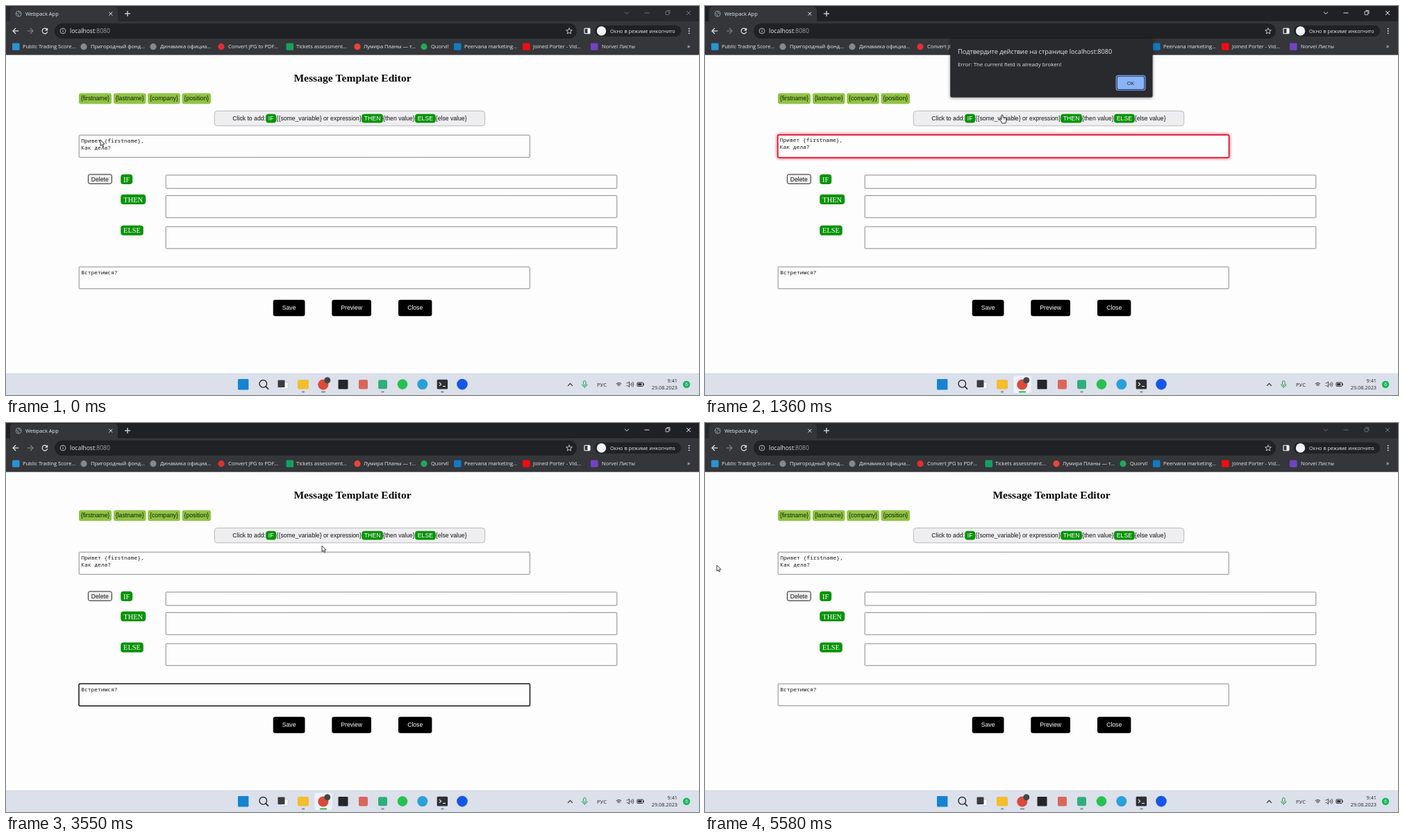
These frames come from a looping animation (998 by 561 pixels, 5.61 s). An HTML page with a canvas:

```html
<!DOCTYPE html>
<html lang="ru">
<head>
<meta charset="utf-8">
<title>Message Template Editor</title>
<style>
html, body { margin: 0; width: 100%; height: 100%; overflow: hidden; background: #fdfdfd; }
canvas { display: block; width: 998px; height: 561px; }
</style>
</head>
<body>
<canvas id="stage"></canvas>
<script>
const W = 998, H = 561, LOOP = 5610;
const canvas = document.getElementById('stage');
const ratio = window.devicePixelRatio || 1;
canvas.width = Math.round(W * ratio);
canvas.height = Math.round(H * ratio);
const ctx = canvas.getContext('2d');

const UI = '"Open Sans", "Noto Sans", sans-serif';
const SANS = '"Liberation Sans", Arial, sans-serif';
const SERIF = '"Liberation Serif", "Times New Roman", serif';
const MONO = '"Noto Sans Mono", monospace';
const GREEN = '#089308', FRAME = '#202124', BAR = '#35363a', PALE = '#e8eaed';

function text(str, x, y, size, family, color, align = 'left', weight = '') {
  ctx.font = `${weight} ${size}px ${family}`;
  ctx.fillStyle = color;
  ctx.textAlign = align;
  ctx.fillText(str, x, y);
}

function box(x, y, w, h, r, fill, stroke, lw = 1) {
  ctx.beginPath();
  ctx.roundRect(x, y, w, h, r);
  if (fill) { ctx.fillStyle = fill; ctx.fill(); }
  if (stroke) { ctx.strokeStyle = stroke; ctx.lineWidth = lw; ctx.stroke(); }
}

function disc(x, y, r, fill, stroke, lw = 1) {
  ctx.beginPath();
  ctx.arc(x, y, r, 0, 7);
  if (fill) { ctx.fillStyle = fill; ctx.fill(); }
  if (stroke) { ctx.strokeStyle = stroke; ctx.lineWidth = lw; ctx.stroke(); }
}

function path(ox, oy, pts, stroke, lw = 1, fill) {
  ctx.beginPath();
  for (let i = 0; i < pts.length; i += 2) ctx.lineTo(ox + pts[i], oy + pts[i + 1]);
  if (fill) { ctx.closePath(); ctx.fillStyle = fill; ctx.fill(); }
  ctx.strokeStyle = stroke;
  ctx.lineWidth = lw;
  ctx.stroke();
}

function cross(x, y, r, color) {
  path(x, y, [-r, -r, r, r], color);
  path(x, y, [r, -r, -r, r], color);
}

// ---- browser frame ----
const bookmarks = [
  [9, 24, 'Public Trading Score...', '#2b93d1', 'square'],
  [107, 122, 'Пригородный фонд...', '#85888c', 'disc'],
  [207, 222, 'Динамика официа...', '#85888c', 'disc'],
  [305, 320, 'Convert JPG to PDF...', '#e52d35', 'disc'],
  [403.5, 418, 'Tickets assessment...', '#12a260', 'square'],
  [501, 515, 'Лумира Планы — т...', '#ee4338', 'disc'],
  [597, 612, 'Quorvi!', '#22a95b', 'disc'],
  [645, 660, 'Peervana marketing...', '#1279c4', 'square'],
  [744, 759, 'Joined Porter - Vid...', '#f00d12', 'square'],
  [842, 858, 'Norvel Листы', '#7441c4', 'square']
];

function drawBrowser(active) {
  box(0, 0, W, 23, 0, active ? FRAME : '#28292c');
  box(6, 1, 155, 24, [5, 5, 0, 0], BAR);
  box(0, 22, W, 48.5, 0, BAR);

  disc(18.2, 11.2, 4, null, '#9aa0a6', .9);
  path(18.2, 11.2, [-3.7, -1, -1, .5, 0, 3.6], '#9aa0a6', .9);
  path(18.2, 11.2, [0, -3.7, .6, -1.2, 3.6, 0], '#9aa0a6', .9);
  text('Webpack App', 28, 13.8, 7.5, UI, PALE);
  cross(150.8, 11.2, 2.4, PALE);
  path(175, 11, [-4, 0, 4, 0], PALE, 1.2);
  path(175, 11, [0, -4, 0, 4], PALE, 1.2);

  const win = active ? '#f1f1f1' : '#77797d';
  path(894, 10, [-3, -1.3, 0, 1.5, 3, -1.3], win, .9);
  path(923, 10, [-3.5, 0, 3.5, 0], win, .9);
  box(950, 7.8, 4.8, 4.8, .5, null, win, .8);
  path(951.5, 7.7, [0, -1.2, 4.5, -1.2, 4.5, 3.4], win, .8);
  cross(983, 10, 3, win);

  path(14, 36, [4.2, 0, -4, 0], PALE, 1.2);
  path(14, 36, [0, -4, -4, 0, 0, 4], PALE, 1.2);
  path(35, 36, [-4.2, 0, 4, 0], '#808387', 1.1);
  path(35, 36, [0, -4, 4, 0, 0, 4], '#808387', 1.1);
  ctx.beginPath();
  ctx.arc(56, 36, 3.8, .3, 5.5);
  ctx.strokeStyle = PALE; ctx.lineWidth = 1.2; ctx.stroke();
  path(59.8, 32, [0, 0, 0, 3.2, -3.2, 3.2], PALE, .6, PALE);

  box(70, 25.2, 752, 21.8, 11, FRAME);
  disc(82, 36, 3.9, null, '#bdc1c6', .9);
  box(81.5, 35.3, 1, 2.8, 0, '#bdc1c6');
  box(81.5, 33.6, 1, 1, 0, '#bdc1c6');
  text('localhost', 92, 39.1, 8.6, UI, PALE);
  const port = 92 + ctx.measureText('localhost').width;
  text(':8080', port, 39.1, 8.6, UI, '#9aa0a6');

  const star = [];
  for (let i = 0; i <= 10; i++) {
    const a = i * Math.PI / 5 - Math.PI / 2, r = i % 2 ? 2 : 4.6;
    star.push(r * Math.cos(a), r * Math.sin(a));
  }
  path(811, 36.3, star, PALE, .8);
  box(833, 32.2, 8, 7.6, 1, null, '#fff', 1.1);
  box(837.5, 32.2, 3.5, 7.6, 0, '#fff');
  box(848, 28, 124, 16, 8, FRAME);
  disc(857.5, 36, 6.7, '#f2f3f4');
  text('Окно в режиме инкогнито', 870, 38.6, 7.3, UI, PALE);
  for (const dy of [-3.3, 0, 3.3]) disc(983.7, 36 + dy, .9, PALE);

  for (const [x, tx, label, color, kind] of bookmarks) {
    if (kind === 'disc') disc(x + 5, 58.7, 4.6, color);
    else box(x, 53.6, 10.6, 10.2, 1.5, color);
    text(label, tx, 61.4, 7.5, UI, PALE);
  }
  text('»', 981, 61.4, 8.5, UI, PALE);
}

// ---- page ----
function field(x, y, w, h, lines, state) {
  if (state === 'red') {
    ctx.save();
    ctx.shadowColor = 'rgba(240,20,50,.85)';
    ctx.shadowBlur = 4 * ratio;
    box(x, y, w, h, 1.5, '#fff', '#d9102e', 1.5);
    ctx.restore();
    box(x, y, w, h, 1.5, '#fdfdfd', '#d9102e', 1.4);
  } else if (state === 'black') {
    box(x, y, w, h, 1.5, '#fdfdfd', '#16161c', 1.5);
  } else {
    box(x + .2, y + .2, w - .4, h - .4, 1, '#fdfdfd', '#7d7d84', .9);
  }
  const d = state === 'red' ? .5 : 0;
  lines.forEach((s, i) => text(s, x + 3.2 - d, y + 10.8 - d + i * 9.8, 7.95, MONO, '#161616'));
}

function drawPage(state1, state2) {
  box(0, 70.5, W, 460, 0, '#fdfdfd');
  text('Message Template Editor', 499, 109, 15.6, SERIF, '#080808', 'center', 'bold');

  for (const [x, w, s] of [[105, 47, '{firstname}'], [155, 46.5, '{lastname}'],
                           [204.3, 46.5, '{company}'], [253.6, 41.4, '{position}']]) {
    box(x, 125.8, w, 15.4, 3, '#8fc443');
    text(s, x + w / 2, 136.4, 8.67, SANS, '#141c08', 'center');
  }

  box(300.3, 151.4, 389.4, 21.4, 4, '#eeeef0', '#b5b4ac', .9);
  text('Click to add:', 326.3, 165, 8.67, SANS, '#111');
  text('{{some_variable} or expression}', 389.6, 165, 8.67, SANS, '#111');
  text('{then value}', 543, 165, 8.67, SANS, '#111');
  text('{else value}', 618.8, 165, 8.67, SANS, '#111');
  for (const [x, w, s] of [[374.2, 15, 'IF'], [512.2, 30.8, 'THEN'], [589, 29.8, 'ELSE']]) {
    box(x, 155.8, w, 12.6, 4, GREEN);
    text(s, x + w / 2, 165, 8.67, SANS, '#fff', 'center');
  }

  field(105, 186, 649.5, 32.5, ['Привет {firstname},', 'Как дела?'], state1);
  field(230, 243.7, 650, 19.6, [], '');
  field(230, 273.2, 650, 32.2, [], '');
  field(230, 318, 650, 32, [], '');
  field(105, 376, 649.5, 32, ['Встретимся?'], state2);

  box(118.4, 242.9, 33.9, 13.4, 2.5, '#efefef', '#222', 1);
  text('Delete', 135.3, 252.7, 8.67, SANS, '#111', 'center');
  for (const [y, w, s] of [[242.8, 17, 'IF'], [271.8, 36, 'THEN'], [316.6, 32.6, 'ELSE']]) {
    box(165.2, y, w, 14.2, 4, GREEN);
    text(s, 165.2 + w / 2, y + 10.8, 10.4, SERIF, '#fff', 'center');
  }
  for (const [x, w, s] of [[384.7, 45.8, 'Save'], [469.3, 56.7, 'Preview'], [565, 48.4, 'Close']]) {
    box(x, 423.8, w, 23.4, 3, '#000');
    text(s, x + w / 2, 438, 8.67, SANS, '#fff', 'center');
  }
}

// ---- taskbar ----
function drawTaskbar(active) {
  const ink = '#26282c', mid = 545.6;
  box(0, 530, W, 31, 0, '#dbe0ea');
  box(0, 529.8, W, .7, 0, '#cfd4de');
  if (active) box(444.5, 533.5, 25, 24.5, 3, '#f1f3f8');

  box(334, 538, 15.4, 15.4, 1, '#1583d3');
  disc(370.3, 544.8, 5.3, null, ink, 1.4);
  path(374, 548.6, [0, 0, 4, 4], ink, 1.6);
  box(395.5, 542.5, 10.5, 9.5, 1, '#f8f9fb', '#b4b8be', .6);
  box(391.5, 539.5, 10, 10.5, 1, '#3a3c40');
  box(420, 539, 16, 13.5, 2, '#f4bd2d');
  disc(456.8, 546, 7.6, '#dc4a3c');
  disc(462.8, 539.8, 4.5, '#444649');
  box(478.5, 539, 14, 13.5, 1, '#25262a');
  box(508, 539, 13, 13.5, 2, '#d9665b');
  box(536, 539.2, 13, 13, 2.5, '#2eaf7d');
  disc(571, mid, 7.3, '#27c152');
  disc(599.8, mid, 7.5, '#29a0d8');
  box(620.7, 538.8, 15.4, 13.6, 1.5, '#2d2f33');
  path(624, 543, [0, 0, 2.6, 2.4, 0, 4.8], '#f4f4f4', 1.1);
  path(629, 548.5, [0, 0, 4, 0], '#f4f4f4', 1.1);
  disc(657, mid, 7.8, '#1556e8');

  for (const x of [428, 542.5, 628.5]) box(x - 2.2, 555.6, 4.4, 1.8, .9, '#858a93');
  if (active) box(451.8, 555.6, 10.4, 2, 1, '#25b654');
  else box(453.8, 555.6, 6.4, 1.8, .9, '#858a93');

  path(812.5, 546, [-3.4, 1.8, 0, -1.6, 3.4, 1.8], ink, 1.1);
  box(831.6, 540.5, 3.4, 6.4, 1.7, null, '#2a9b55', 1);
  ctx.beginPath();
  ctx.arc(833.3, 545.3, 3.6, 0, Math.PI);
  ctx.stroke();
  path(833.3, 549, [0, 0, 0, 2], '#2a9b55', 1);
  text('РУС', 858, 548.5, 7.6, UI, ink, 'center');

  for (const r of [1.8, 3.6, 5.4]) {
    ctx.beginPath();
    ctx.arc(882.5, 549, r, -2.3, -.84);
    ctx.strokeStyle = ink; ctx.lineWidth = 1; ctx.stroke();
  }
  path(893.5, 543.8, [0, 0, 2, 0, 4, -2, 4, 5.8, 2, 3.8, 0, 3.8], ink, .8);
  for (const r of [2, 4, 6]) {
    ctx.beginPath();
    ctx.arc(897.6, 545.7, r, -.7, .7);
    ctx.stroke();
  }
  box(909, 543, 8.6, 5.4, 1, null, ink, 1);
  box(910.2, 544.2, 5.2, 3, 0, ink);
  box(917.6, 544.6, 1.2, 2.2, 0, ink);
  text('9:41', 967, 542.8, 7.3, UI, ink, 'right');
  text('29.08.2023', 967, 552.7, 7.3, UI, ink, 'right');
  disc(980, 545.8, 5.2, '#1ab65c');
  text('6', 980, 548.2, 6.4, UI, '#fff', 'center');
}

// ---- dialog ----
const clamp = v => Math.max(0, Math.min(1, v));
const dialogs = [
  { open: 985, close: 2180, msg: 'Error: The current field is already broken!' },
  { open: 3900, close: 4680, msg: 'Error: Can split only initial block!' }
];

function drawDialog(d, t, hover) {
  const a = t < d.close ? clamp((t - d.open) / 190) : 1 - clamp((t - d.close) / 100);
  if (a <= 0) return;
  ctx.save();
  ctx.globalAlpha = a;
  ctx.translate(499, 90 - 11 * (1 - a));
  ctx.scale(1 + .01 * (1 - a), 1);
  ctx.translate(-499, -90);
  ctx.save();
  ctx.shadowColor = 'rgba(0,0,0,.45)';
  ctx.shadowBlur = 4 * ratio;
  ctx.shadowOffsetY = ratio;
  box(353.2, 47, 291.4, 84.8, 2.5, '#292a2d');
  ctx.restore();
  text('Подтвердите действие на странице localhost:8080', 364, 69, 9.15, UI, PALE);
  text(d.msg, 364, 87.4, 7.85, UI, '#dfe1e5');
  box(592.2, 100.3, 41.8, 21.2, 3, '#1f2c45', '#7aa5ec', 1.2);
  box(593.8, 101.8, 38.6, 18.2, 2, hover ? '#7fa5e4' : '#8ab4f8');
  text('OK', 613, 113.7, 7.5, UI, '#202124', 'center');
  ctx.restore();
}

// ---- pointer: time, x, y of the hot spot ----
const track = [
  [0, 136, 193], [180, 136, 193], [300, 150, 199], [480, 156, 200], [900, 421, 157],
  [1000, 422, 157], [1360, 428, 157], [1480, 432, 157], [1950, 617, 113], [2340, 620, 115],
  [2700, 420, 388], [2960, 420, 388], [3550, 455, 177], [3700, 450, 158],
  [4050, 452, 158], [4500, 622, 114], [4720, 623, 115], [5210, 27, 206], [5500, 17, 205], [LOOP, 17, 205]
];

function pointerAt(t) {
  let i = 1;
  while (i < track.length - 1 && track[i][0] < t) i++;
  const [t0, x0, y0] = track[i - 1], [t1, x1, y1] = track[i];
  const k = clamp((t - t0) / (t1 - t0)), e = k * k * (3 - 2 * k);
  return [x0 + (x1 - x0) * e, y0 + (y1 - y0) * e];
}

const inside = (x, y, l, t, r, b) => x > l && x < r && y > t && y < b;
const ARROW = [0, 0, 0, 8.6, 2, 6.8, 3.4, 9.7, 4.7, 9.1, 3.4, 6.3, 6, 6.1];
const HAND = [-1.1, .8, -1.1, 6.8, -2.4, 5.5, -3.4, 6.3, -1.1, 10.3, -.4, 12, 4.8, 12,
              5.8, 9, 5.8, 5, 4.6, 4.3, 2.8, 4, 1.1, 3.6, 1.1, .8, 0, 0];

function drawPointer(x, y, active) {
  if (inside(x, y, 300, 151, 690, 173)) {
    path(x, y, HAND, '#111', .9, '#fff');
    path(x, y, [2.8, 4.2, 2.8, 7], '#111', .6);
  } else if (active && (inside(x, y, 105, 186, 755, 219) || inside(x, y, 105, 376, 755, 408) ||
             inside(x, y, 230, 244, 880, 263) || inside(x, y, 230, 273, 880, 305) ||
             inside(x, y, 230, 318, 880, 350))) {
    path(x, y, [0, -4.5, 0, 4.5], '#222', .8);
    path(x, y, [-1.8, -4.7, 1.8, -4.7], '#222', .8);
    path(x, y, [-1.8, 4.7, 1.8, 4.7], '#222', .8);
  } else {
    path(x, y, ARROW, '#111', .8, '#fff');
  }
}

// Focus ring turns red while the error is shown.
function ring(t, focus, error, end) {
  if (t < focus || t >= end) return '';
  return t < error ? 'black' : 'red';
}

function draw(t) {
  ctx.setTransform(ratio, 0, 0, ratio, 0, 0);
  const active = t >= 300 && t < 5400;
  const [x, y] = pointerAt(t);
  drawPage(ring(t, 300, 960, 2180), ring(t, 2960, 3880, 4680));
  drawBrowser(active);
  drawTaskbar(active);
  const hover = inside(x, y, 592, 100, 634, 121);
  for (const d of dialogs) drawDialog(d, t, hover);
  if (t < 2240 || t > 2330) drawPointer(x, y, active);
}

const start = performance.now();
function tick() {
  draw((performance.now() - start) % LOOP);
  requestAnimationFrame(tick);
}
tick();
</script>
</body>
</html>
```
